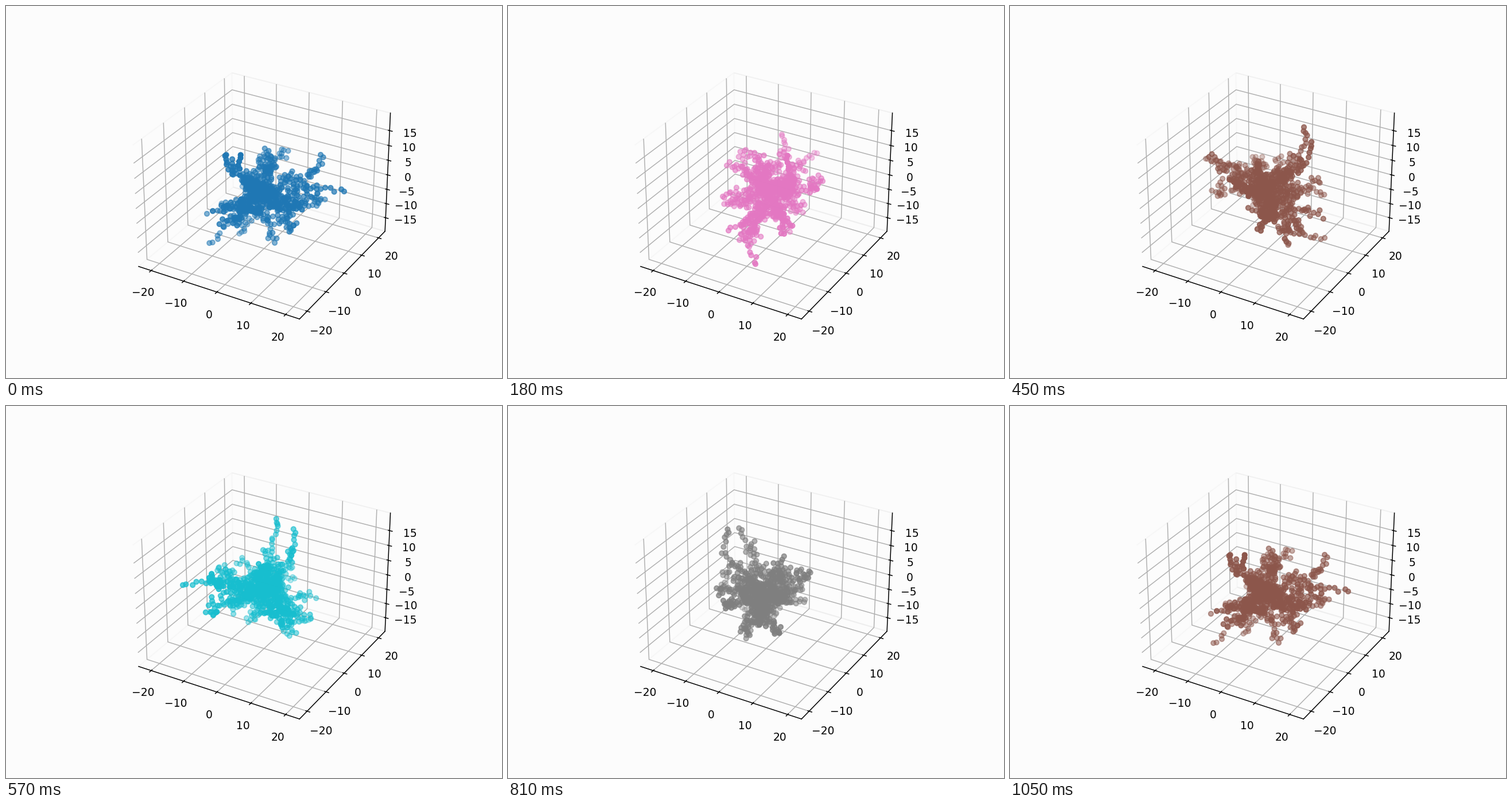
Write a matplotlib script that moves like this. It is 864 by 648 pixels and loops after 1.08 s.

```python
import numpy as np
import matplotlib.pyplot as plt
from matplotlib.animation import FuncAnimation

FRAMES = 36
COUNT = 730
STEP = 1.25          # distance between neighbouring particles
GAP = 0.95           # closest two particles may sit
PX = np.array([6.72, 6.72, 5.13])   # pixels per data unit

# Arms as paths from the core: (right, back, up) in pixels.
ARMS = [
    [(-35, -73, 54), (-38, -59, 96)],
    [(-64, -28, 60), (-64, -40, 86)],
    [(88, 12, 28), (103, 23, 48)],
    [(-72, -1, -66), (-96, -31, -75)],
    [(138, -30, 15)],
    [(20, -38, -75)],
    [(44, -49, -42)],
    [(-100, -14, -32)],
    [(-79, -74, -20)],
    [(-70, -71, 9)],
    [(60, -72, 9)],
    [(18, -80, 19)],
    [(6, 80, 32)],
    [(28, 62, 30)],
    [(8, 27, 57)],
    [(-27, 68, -12)],
    [(-16, 62, -30)],
    [(-76, 33, -42)],
    [(-44, 10, -80)],
    [(-52, 25, -68)],
    [(107, 8, -18)],
    [(78, -11, -20)],
]


def grow_cluster(rng):
    """Arms first, then short random twigs that stick to what is there."""
    pts, depth = [np.zeros(3)], [0]

    def stick(p, level):
        if np.min(np.sum((np.array(pts) - p) ** 2, axis=1)) > GAP ** 2:
            pts.append(p)
            depth.append(level)

    for arm in ARMS:
        start = np.zeros(3)
        for node in arm:
            end = np.array(node) / PX
            length = np.linalg.norm(end - start)
            bend = rng.normal(0, 0.07 * length, 3)
            n = int(np.ceil(length / STEP))
            for t in np.arange(1, n + 1) / n:
                wobble = rng.normal(0, 0.3, 3) * (t < 1)
                stick(start + (end - start) * t
                      + bend * np.sin(np.pi * t) + wobble, 0)
            start = end

    while len(pts) < COUNT:
        i = rng.integers(len(pts))
        # twigs get sparser towards the tips
        reach = np.linalg.norm(pts[i])
        if depth[i] < 4 and rng.random() < np.exp(-(reach / 14) ** 4):
            d = rng.normal(size=3)
            stick(pts[i] + STEP * d / np.linalg.norm(d), depth[i] + 1)
    return np.array(pts)


cluster = grow_cluster(np.random.default_rng(7))

fig = plt.figure(figsize=(6.4, 4.8), dpi=135, facecolor="#fcfcfc")
ax = fig.add_subplot(projection="3d", facecolor="#fcfcfc")
for axis in (ax.xaxis, ax.yaxis, ax.zaxis):
    axis.pane.fill = False
ax.set_xticks(range(-20, 21, 10))
ax.set_yticks(range(-20, 21, 10))
ax.set_zticks(range(-15, 16, 5))
ax.set_xlim(-23.93, 23.93, view_margin=0)
ax.set_ylim(-23.93, 23.93, view_margin=0)
ax.set_zlim(-19.83, 20.83, view_margin=0)

shown = []


def update(k):
    while shown:
        shown.pop().remove()
    # the screen's right-hand direction lies at 30 degrees in the xy plane
    a = np.radians(30 + 360 * k / (FRAMES - 1))
    u, w, z = cluster.T
    x = u * np.cos(a) - w * np.sin(a)
    y = u * np.sin(a) + w * np.cos(a)
    shown.append(ax.scatter(x, y, z, color=f"C{k % 10}"))
    return shown


anim = FuncAnimation(fig, update, frames=FRAMES, init_func=lambda: update(0),
                     interval=30, repeat=True, repeat_delay=0, blit=False)
plt.show()
```
